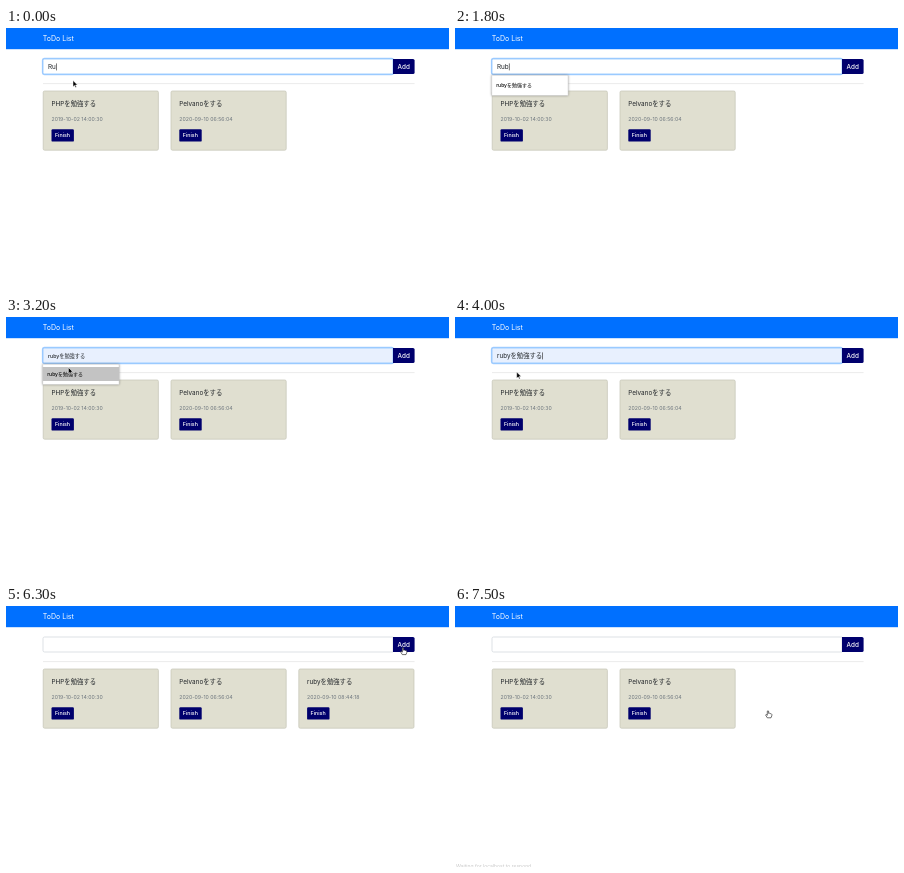
These frames come from a looping animation (443x261 px, 7600 ms). An HTML page:

```html
<!DOCTYPE html>
<html lang="ja">
<head>
<meta charset="utf-8">
<title>ToDo List</title>
<style>
html, body { margin: 0; width: 100%; height: 100%; overflow: hidden; background: #fff; }
svg { display: block; width: 100vw; height: 100vh; }
text { font-family: Inter, "Noto Sans CJK JP", "Noto Sans CJK", sans-serif; font-size: 6.35px; fill: #212529; white-space: pre; }
.brand { font-size: 7px; fill: #fff; }
.date { font-size: 5.2px; fill: #6c757d; }
.finish { font-size: 5.3px; fill: #fff; font-weight: 500; }
.add { font-size: 6.3px; fill: #fff; font-weight: 500; }
.suggestion { font-size: 5px; fill: #000; font-weight: 500; }
.status { font-size: 5px; fill: #c8c8c8; }
.button { fill: #00006d; }
.card { fill: #e0dfd0; stroke: #c5c5b6; stroke-width: .7; }
.popup { fill: #fff; stroke: #c6c6c6; stroke-width: .5; filter: drop-shadow(0 .8px 1px rgba(0, 0, 0, .35)); }
</style>
</head>
<body>
<svg id="stage" viewBox="0 0 443 261">
  <rect width="443" height="261" fill="#fff"/>
  <rect width="443" height="21.2" fill="#0070ff"/>
  <text class="brand" x="36.8" y="12.8">ToDo List</text>

  <rect id="ring" x="36.5" y="30.5" width="351" height="16" rx="2" fill="none" stroke="#a9d0ff" stroke-width="1.3"/>
  <path id="field" d="M38.6 31H387V46H38.6Q37 46 37 44.4V32.6Q37 31 38.6 31Z" stroke-width=".7"/>
  <text id="value" x="42" y="41.1"></text>
  <rect id="caret" y="35.4" width=".6" height="7" fill="#222"/>
  <g id="add">
    <path class="button" d="M387 31H407Q408.6 31 408.6 32.6V44.4Q408.6 46 407 46H387Z"/>
    <text class="add" x="391.6" y="41">Add</text>
  </g>

  <path d="M37 55.6H408.6" stroke="#e2e2e2" stroke-width=".7"/>
  <g id="cards"></g>

  <g id="popup">
    <rect class="popup" x="36.7" y="47.2" width="76.4" height="20.3" rx=".6"/>
    <rect id="highlight" x="36.7" y="50" width="76.4" height="14" fill="#c3c3c3"/>
    <text class="suggestion" x="41.2" y="58.9">rubyを勉強する</text>
  </g>

  <text id="status" class="status" x="1" y="262">Waiting for localhost to respond...</text>

  <path id="arrow" d="M0 0V6.3L1.5 5L2.5 7.1L3.5 6.6L2.5 4.6H4.5Z" fill="#000" stroke="#fff" stroke-width=".5"/>
  <path id="hand" d="M-.7 .3Q0 -.4 .6 .3V2.6L1.5 2.4L2.3 2.8L3.2 2.9L3.8 3.5V5L3 7H-.7L-2.2 4.6Q-2.4 3.6 -1.5 3.8L-.7 4.5Z" fill="#fff" stroke="#222" stroke-width=".65" stroke-linejoin="round"/>
</svg>
<script>
const LOOP = 7600, STEP = 100;
const TASK = "rubyを勉強する";
const $ = id => document.getElementById(id);
const show = (node, on) => node.setAttribute("visibility", on ? "visible" : "hidden");
const between = (t, from, to) => t >= from && t < to;

const titles = [
  ["PHPを勉強する", "2019-10-02 14:00:30"],
  ["Pelvanoをする", "2020-09-10 06:56:04"],
  [TASK, "2020-09-10 08:44:18"]
];
$("cards").innerHTML = titles.map(([title, date], i) => `
  <g transform="translate(${37.2 + i * 127.8} 63)">
    <rect class="card" width="115.2" height="59.2" rx="1.4"/>
    <text x="8.3" y="15.3">${title}</text>
    <text class="date" x="8.3" y="29.8">${date}</text>
    <g class="done">
      <rect class="button" x="8.3" y="38.2" width="22.4" height="12.4" rx="1.2"/>
      <text class="finish" x="11.8" y="46.4">Finish</text>
    </g>
  </g>`).join("");
const newCard = $("cards").lastElementChild;
const newDone = newCard.querySelector(".done");

// Pointer stops: time, x, y
const stops = [
  [0, 67, 52.4], [2500, 67, 52.4], [3000, 62.4, 50.4], [3500, 62.4, 50.4],
  [3800, 61.7, 55], [4100, 61.7, 55], [4600, 330, 52],
  [4800, 397, 41.6], [6400, 397, 41.6], [7000, 313, 104.8], [LOOP, 313, 104.8]
];

function pointerAt(t) {
  const i = stops.findIndex(stop => stop[0] > t);
  const [t0, x0, y0] = stops[i - 1], [t1, x1, y1] = stops[i];
  const u = (t - t0) / (t1 - t0), k = u * u * (3 - 2 * u);
  return [x0 + (x1 - x0) * k, y0 + (y1 - y0) * k];
}

function render(t) {
  const submitted = t >= 5500;
  const preview = between(t, 2800, 3400);
  const filled = between(t, 2800, 5500);
  const value = submitted ? "" : filled ? TASK : t < 1000 ? "Ru" : "Rub";

  const text = $("value");
  text.textContent = value;
  text.style.fontSize = preview ? "5.2px" : "";
  text.style.fontWeight = preview ? 500 : 400;
  $("field").setAttribute("fill", filled ? "#e8f0fe" : "#fff");
  $("field").setAttribute("stroke", submitted ? "#ced4da" : "#80bdff");
  show($("ring"), !submitted);
  $("caret").setAttribute("x", 42.2 + text.getComputedTextLength());
  show($("caret"), !submitted && !preview && (t < 2800 || between(t, 3400, 4500)));

  show($("popup"), between(t, 1000, 3400));
  show($("highlight"), preview);

  const [x, y] = pointerAt(t);
  const overAdd = x > 387 && y > 31 && y < 46;
  const overDone = between(t, 6400, LOOP) && x < 324 && y > 101;
  const hand = overAdd || overDone;
  for (const id of ["arrow", "hand"]) $(id).setAttribute("transform", `translate(${x} ${y})`);
  show($("arrow"), !hand && !between(t, 1000, 2500));
  show($("hand"), hand);
  $("add").setAttribute("opacity", overAdd && !submitted ? .5 : 1);

  show(newCard, between(t, 5500, 7300));
  newDone.setAttribute("opacity", overDone ? .5 : 1);
  show($("status"), t >= 7400);
}

const start = performance.now();
function tick() {
  const t = (performance.now() - start) % LOOP;
  render(Math.floor(t / STEP) * STEP);
  requestAnimationFrame(tick);
}
tick();
</script>
</body>
</html>
```
